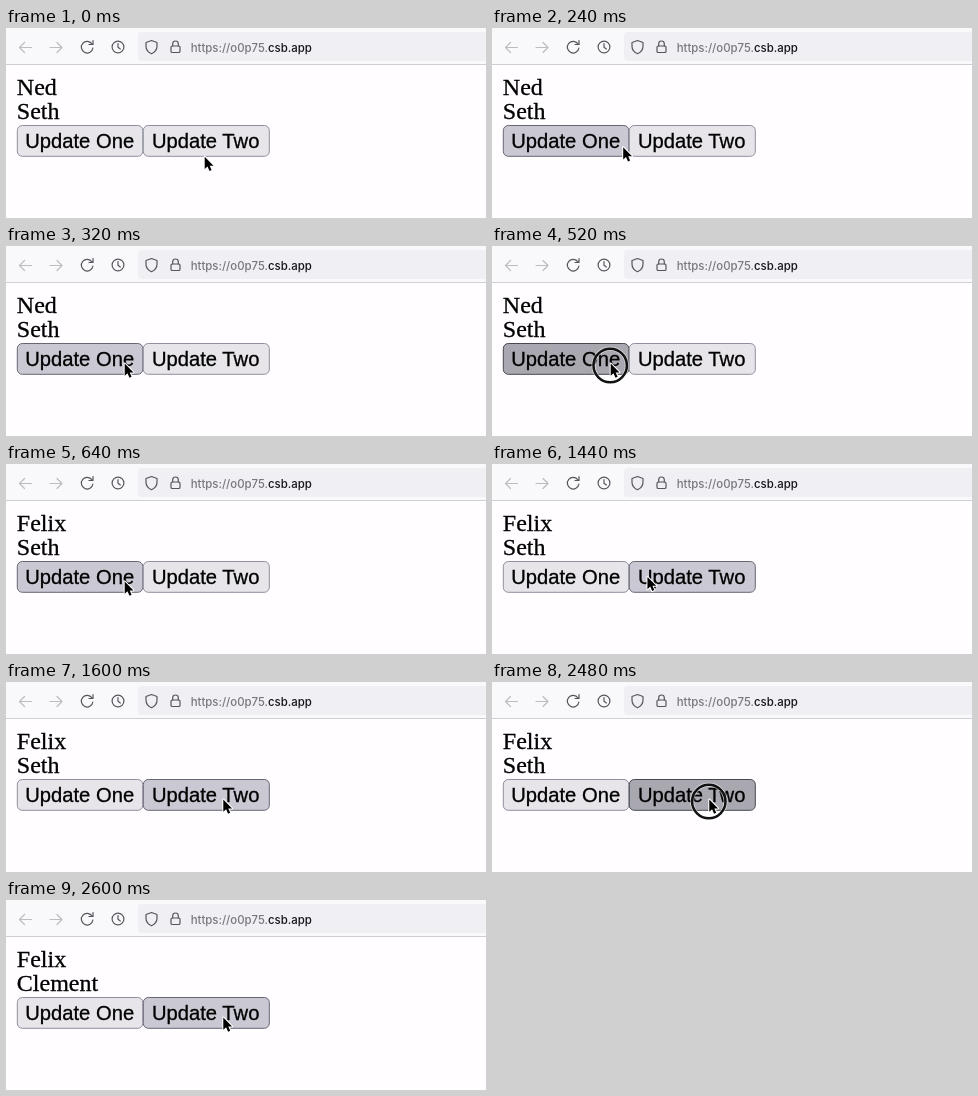
An HTML page that plays this animation: 480 px wide and 190 px high, repeating every 4120 ms.

```html
<!DOCTYPE html>
<html lang="en">
<head>
<meta charset="utf-8">
<title>Update buttons</title>
<style>
  html, body { margin: 0; width: 100%; height: 100%; overflow: hidden; background: #fffdff; }
  svg { display: block; }
  .name, .label { stroke: #000; stroke-width: .3; }
  .name { font: 24px "Liberation Serif", "Times New Roman", serif; }
  .label { font: 20.2px "Liberation Sans", Arial, sans-serif; text-anchor: middle; }
  .url { font: 500 11.4px Inter, sans-serif; fill: #15141a; }
  .icon { fill: none; stroke: #55555d; stroke-width: 1.2; stroke-linecap: round; stroke-linejoin: round; }
  .off { stroke: #bcbcc1; }
</style>
</head>
<body>
<svg width="480" height="190" viewBox="0 0 480 190">
  <rect width="480" height="36" fill="#f9f8fb"/>
  <path d="M0 36.500H480" stroke="#d0d0d4"/>
  <rect x="132" y="4" width="360" height="29" rx="4" fill="#f0eff4"/>
  <g class="icon">
    <path class="off" d="M25.500 19.500H14M18.500 14.500l-5 5 5 5M44 19.500H55.500M51 14.500l5 5-5 5"/>
    <path d="M86 16a5.800 5.800 0 1 0 .9 4M87 12.500v4h-4"/>
    <circle cx="112" cy="19" r="5.900"/>
    <path d="M112 15.500v3.700l2.300 1.800"/>
    <path d="M145.500 12.500l5.500 2v3.700q0 5-5.500 7.500q-5.500-2.500-5.500-7.500v-3.700z"/>
    <rect x="165" y="18" width="9" height="6.500" rx="1.300"/>
    <path d="M166.700 18v-2.200a2.800 2.800 0 0 1 5.600 0v2.200"/>
  </g>
  <text class="url" x="184.700" y="24"><tspan fill="#77777c">https://o0p75.</tspan>csb.app</text>

  <text class="name" id="first" x="10.800" y="67"></text>
  <text class="name" id="second" x="10.800" y="91"></text>
  <rect id="one" x="11.300" y="97.500" width="125.500" height="30.800" rx="5"/>
  <rect id="two" x="137.300" y="97.500" width="126" height="30.800" rx="5"/>
  <text class="label" x="73.700" y="120">Update One</text>
  <text class="label" x="199.700" y="120">Update Two</text>

  <g id="pointer">
    <g id="ring" fill="none">
      <circle cx="-.5" cy="2" r="16.700" stroke="#fff" stroke-opacity=".6" stroke-width="4"/>
      <circle cx="-.5" cy="2" r="16.700" stroke="#111" stroke-width="2.500"/>
    </g>
    <path d="M0 0V12.300L2.800 9.700L4.800 14.200L6.900 13.200L5 8.900H8.800Z"
      stroke="#fff" stroke-width="2" stroke-linejoin="round" paint-order="stroke"/>
  </g>
</svg>
<script>
const LOOP = 4120, STEP = 40;
const $ = id => document.getElementById(id);
const STYLES = {
  idle: ['#e7e5ea', '#8f8f9d'],
  hover: ['#cac8d3', '#676774'],
  active: ['#a9a8b0', '#484851']
};
const within = (t, a, b) => t >= a && t < b;
const progress = (t, a, b) => Math.min(1, Math.max(0, (t - a) / (b - a)));
const mix = (a, b, p) => a + (b - a) * p;

function pointerAt(t) {
  if (t < 1400) {
    const p = progress(t, 0, 320), e = p * p * (3 - 2 * p);
    return [mix(198.7, 118.7, e), mix(128.8, 117.5, e)];
  }
  const e = 1 - (1 - progress(t, 1360, 1600)) ** 1.15;
  return [mix(118.7, 217.3, e), 117.5 - 5 * Math.sin(Math.PI * e)];
}

function paint(id, over, pressed) {
  const [fill, stroke] = STYLES[!over ? 'idle' : pressed ? 'active' : 'hover'];
  $(id).setAttribute('fill', fill);
  $(id).setAttribute('stroke', stroke);
}

function draw(now) {
  const t = Math.floor(now % LOOP / STEP) * STEP;
  const [x, y] = pointerAt(t);
  const over = y < 128.5;
  const secondPress = within(t, 2480, 2600);
  const pressed = within(t, 520, 640) || secondPress;

  $('first').textContent = t < 640 ? 'Ned' : 'Felix';
  $('second').textContent = t < 2600 ? 'Seth' : 'Clement';
  paint('one', over && x < 138, pressed);
  paint('two', over && x >= 138, pressed);
  $('ring').style.display = within(t, 480, 640) || secondPress ? '' : 'none';
  $('pointer').setAttribute('transform', `translate(${x} ${y})`);
}

const start = performance.now();
function tick() {
  draw(performance.now() - start);
  requestAnimationFrame(tick);
}
tick();
</script>
</body>
</html>
```
